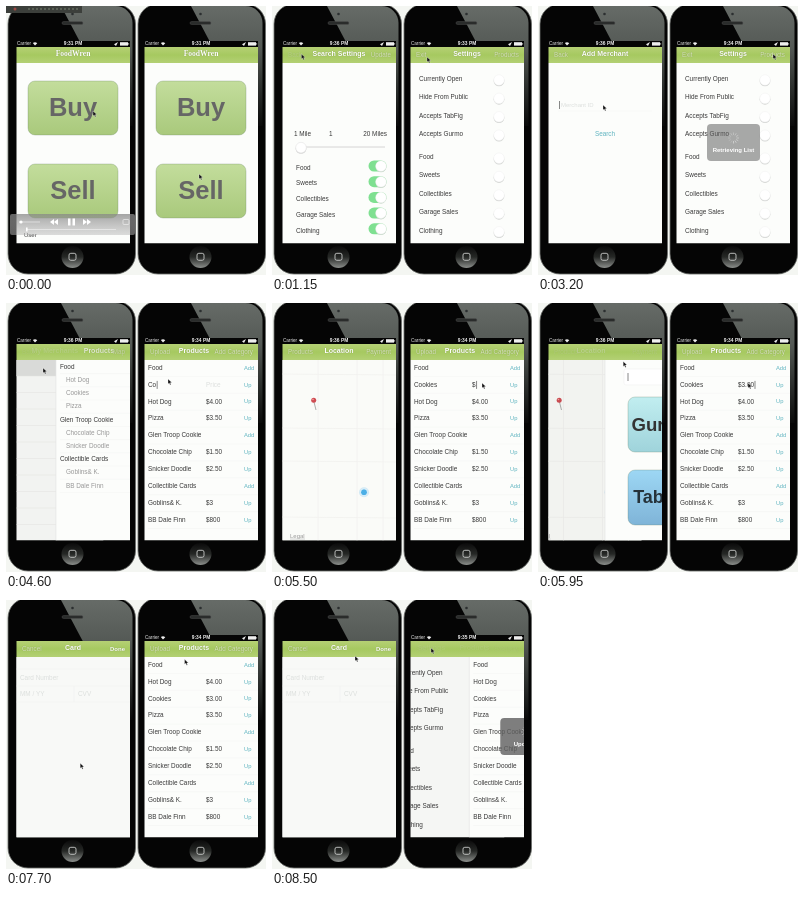
An HTML page with a canvas that plays this animation: 260x269 px, repeating every 8.55 s.

```html
<!DOCTYPE html>
<html lang="en">
<head>
<meta charset="utf-8">
<title>Two phones</title>
<style>
html, body { margin: 0; width: 100%; height: 100%; overflow: hidden; background: #fff; }
canvas { display: block; width: 260px; height: 269px; }
</style>
</head>
<body>
<canvas id="stage"></canvas>
<script>
const LOOP = 8550, STEP = 50, SLIDE = 100;
const W = 114, TOP = 41, BAR = 57, BOTTOM = 237.5;
const INK = '#3a3a3a', TEAL = '#5fb4c0', FAINT = '#dcdfdd', PAPER = '#fcfdfb';
const canvas = document.getElementById('stage');
const c = canvas.getContext('2d');
const scale = Math.max(1, window.devicePixelRatio || 1);
canvas.width = 260 * scale;
canvas.height = 269 * scale;

const clamp = v => Math.max(0, Math.min(1, v));
const lastAt = (steps, t) => steps.filter(s => s[0] <= t).pop();

function text(str, x, y, { size = 6.4, color = INK, align = 'left', bold = false } = {}) {
  c.font = `${bold ? 'bold ' : ''}${size}px "Liberation Sans", Arial, sans-serif`;
  c.textAlign = align;
  c.textBaseline = 'middle';
  c.fillStyle = color;
  c.fillText(str, x, y);
}

function rect(x, y, w, h, fill) {
  c.fillStyle = fill;
  c.fillRect(x, y, w, h);
}

function round(x, y, w, h, r, fill, stroke, width = 0.6) {
  c.beginPath();
  c.roundRect(x, y, w, h, r);
  if (fill) { c.fillStyle = fill; c.fill(); }
  if (stroke) { c.strokeStyle = stroke; c.lineWidth = width; c.stroke(); }
}

function disc(x, y, r, fill, stroke, width = 0.6) {
  round(x - r, y - r, 2 * r, 2 * r, r, fill, stroke, width);
}

function poly(points, fill) {
  c.beginPath();
  points.forEach(p => c.lineTo(...p));
  c.closePath();
  c.fillStyle = fill;
  c.fill();
}

function line(x1, y1, x2, y2, color = '#f1f2f0', width = 0.5) {
  c.strokeStyle = color;
  c.lineWidth = width;
  c.beginPath();
  c.moveTo(x1, y1);
  c.lineTo(x2, y2);
  c.stroke();
}

function shade(y, h, ...colors) {
  const g = c.createLinearGradient(0, y, 0, y + h);
  colors.forEach((color, i) => g.addColorStop(i / (colors.length - 1), color));
  return g;
}

function button(label, x, y, w, h, size, from, to, ink) {
  round(x, y, w, h, 7, shade(y, h, from, to), 'rgba(90,120,90,.45)');
  text(label, x + w / 2, y + h / 2 + 1, { size, color: ink, align: 'center', bold: true });
}

function toggle(x, y, on) {
  if (on) round(x - 8.5, y - 5.5, 18, 11, 5.5, '#7fe091');
  const k = on ? x + 4 : x;
  disc(k, y + 0.9, 5.4, on ? '#c9d9cb' : '#d3d5d3');
  disc(k, y, 5.3, '#fff', '#eceeec', 0.4);
}

function caret(x, y) { line(x, y - 4, x, y + 4, '#555', 0.7); }

function typed(str, x, y, active) {
  text(str, x, y);
  if (active) caret(x + c.measureText(str).width + 1, y);
}

const GOODS = [
  ['Food'], ['Hot Dog', '$4.00'], ['Cookies', '$3.00'], ['Pizza', '$3.50'],
  ['Glen Troop Cookie'], ['Chocolate Chip', '$1.50'], ['Snicker Doodle', '$2.50'],
  ['Collectible Cards'], ['Goblins& K.', '$3'], ['BB Dale Finn', '$800']
];
const NAME_KEYS = [[0, ''], [4550, 'C'], [4600, 'Co'], [4650, 'Cook'], [4700, 'Cookies']];
const PRICE_KEYS = [[0, ''], [5450, '$'], [5550, '$3'], [5600, '$3.'], [5650, '$3.00']];
const CASH_KEYS = [[0, ''], [6150, '1'], [6200, '12'], [6300, '12.'], [6400, '12.00']];

function home() {
  for (const [label, y] of [['Buy', 75], ['Sell', 158]])
    button(label, 12, y, 90, 54, 25.5, '#c3dd9c', '#a9c97c', '#666');
}

function editor(t) {
  let rows = GOODS.slice();
  if (t < 4400) rows.splice(2, 1);
  else if (t < 6900) [rows[1], rows[2]] = [rows[2], rows[1]];
  rows.forEach(([name, price], i) => {
    const y = 65 + i * 16.9;
    line(4, y + 8.4, W, y + 8.4);
    text(price ? 'Up' : 'Add', 100, y, { size: 5.8, color: TEAL });
    if (name === 'Cookies' && t < 6900) {
      const n = lastAt(NAME_KEYS, t)[1], p = lastAt(PRICE_KEYS, t)[1];
      typed(n, 4, y, t < 5000);
      if (p || t >= 5000) typed(p, 62, y, true);
      else text('Price', 62, y, { color: FAINT });
    } else {
      text(name, 4, y);
      if (price) text(price, 62, y);
    }
  });
  hud('Updating', t, 8200);
}

function hud(label, t, from) {
  const alpha = clamp((t - from) / 150);
  if (!alpha) return;
  c.save();
  c.globalAlpha = alpha;
  round(31, 118, 53, 37, 4, 'rgba(95,95,95,.8)');
  for (let i = 0; i < 12; i++) {
    const a = i * Math.PI / 6, x = Math.cos(a), y = Math.sin(a);
    const glow = 0.25 + 0.6 * ((i - t / STEP + 1200) % 12) / 12;
    line(57.5 + 3 * x, 132 + 3 * y, 57.5 + 5.5 * x, 132 + 5.5 * y, `rgba(255,255,255,${glow})`, 0.8);
  }
  c.globalAlpha = 1;
  text(label, 57.5, 144.5, { size: 6, color: '#fff', align: 'center', bold: true });
  c.restore();
}

const PAGES = {
  buyHome: {
    title: 'FoodWren', brand: true,
    draw() { home(); text('User', 8, 229, { size: 6 }); }
  },
  sellHome: { title: 'FoodWren', brand: true, draw: home },
  search: {
    title: 'Search Settings', left: 'Back', right: 'Update', dimLeft: true,
    draw() {
      text('1 Mile', 12, 128);
      text('1', 47, 128);
      text('20 Miles', 105, 128, { align: 'right' });
      line(14, 141, 103, 141, '#c9c9c9', 0.8);
      disc(19, 142.4, 5.4, '#d2d2d2');
      disc(19, 141.6, 5.3, '#fff', '#e4e4e4');
      ['Food', 'Sweets', 'Collectibles', 'Garage Sales', 'Clothing'].forEach((s, i) => {
        const y = 162 + i * 15.7;
        text(s, 14, y);
        toggle(95, y - 2, true);
      });
    }
  },
  merchants: {
    title: 'My Merchants', left: 'Back', right: 'Add',
    draw(t) {
      if (t >= 4450) rect(0, BAR, W, 16, '#e2e3e1');
      for (let y = 73; y < BOTTOM; y += 16.5) line(0, y, W, y, '#e8e9e7');
    }
  },
  add: {
    title: 'Add Merchant', left: 'Back',
    draw() {
      text('Merchant ID', 13, 99, { size: 6, color: FAINT });
      line(10, 105, 104, 105);
      caret(11.5, 99);
      text('Search', 57, 128, { color: TEAL, align: 'center' });
    }
  },
  shop: {
    title: 'Products', right: 'Map',
    draw() {
      GOODS.forEach(([name, price], i) => {
        const y = 64 + i * 13.2;
        text(name, price ? 10 : 4, y, { color: price ? '#999' : INK });
        line(4, y + 6.6, W, y + 6.6);
      });
    }
  },
  map: {
    title: 'Location', left: 'Products', right: 'Payment',
    draw() {
      rect(0, BAR, W, BOTTOM - BAR, '#fafbf8');
      for (const x of [36, 75, 101]) line(x, BAR, x, BOTTOM, '#f1f2ef', 0.8);
      for (const y of [71, 125, 158, 214]) line(0, y, W, y + 1, '#f1f2ef', 0.8);
      line(32, 99, 34, 107, '#999', 0.8);
      disc(31.7, 97.3, 2.5, '#cf4c52');
      disc(31, 96.5, 0.8, '#f4a0a0');
      disc(82, 189.3, 5, 'rgba(90,180,235,.25)');
      disc(82, 189.3, 3.5, '#4cafe6', '#fff', 0.8);
      text('Legal', 8, 233, { size: 6, color: '#999' });
      line(8, 236, 23, 236, '#aaa');
    }
  },
  pay: {
    title: 'Payment', left: 'Location',
    draw(t) {
      const down = t >= 6750 && t < 6900;
      round(19, 66, 76, 16, 2, '#fff', '#f0f0f0');
      typed(lastAt(CASH_KEYS, t)[1], 22, 74, true);
      button('Gurmo', 23, 94, 68, 55, 18.6, '#c1eef0', '#9fd3db', down ? '#98bec3' : '#333');
      button('TabFig', 23, 167, 68, 55, 18, '#9dd7f4', '#7fb4d8', '#26323a');
    }
  },
  card: {
    title: 'Card', left: 'Cancel', right: 'Done', boldRight: true,
    draw() {
      rect(0, BAR, W, BOTTOM - BAR, '#f8f9f7');
      for (const y of [69, 86, 102]) line(0, y, W, y, '#eeefed');
      line(58, 86, 58, 102, '#eeefed');
      text('Card Number', 4, 78, { color: FAINT });
      text('MM / YY', 4, 94, { color: FAINT });
      text('CVV', 62, 94, { color: FAINT });
    }
  },
  settings: {
    title: 'Settings', left: 'Exit', right: 'Products',
    draw(t) {
      const rows = ['Currently Open', 'Hide From Public', 'Accepts TabFig', 'Accepts Gurmo',
        'Food', 'Sweets', 'Collectibles', 'Garage Sales', 'Clothing'];
      rows.forEach((s, i) => {
        const y = 73 + i * 18.4 + (i > 3 ? 4.6 : 0);
        text(s, 9, y);
        toggle(89, y + 1, false);
      });
      if (t < 3500) hud('Retrieving List', t, 3100);
    }
  },
  editor: { title: 'Products', left: 'Upload', right: 'Add Category', mid: 50, draw: editor }
};

// Each scene: start, page, how it arrives. Each pointer entry: time, x, y.
const PHONES = [
  {
    x: 10, body: 2, clock: [[0, '9:31 PM'], [600, '9:36 PM'], [7500, '']],
    scenes: [[0, 'buyHome'], [500, 'search', 'push'], [1200, 'merchants', 'pop'],
      [2400, 'add', 'push'], [3900, 'merchants', 'pop'], [4535, 'shop', 'push'],
      [5000, 'map', 'push'], [5900, 'pay', 'push'], [7500, 'card', 'modal']],
    pointer: [[0, 87, 105], [400, 87, 105], [600, 103, 160], [1000, 30, 48], [1250, 29, 48],
      [2300, 110, 48], [2700, 65, 99], [3600, 65, 99], [3850, 24, 48], [4300, 37, 65],
      [4850, 37, 65], [4950, 112, 48], [5100, -9, 48], [5800, -9, 48], [5850, 102, 48],
      [6100, 60, 74], [6500, 60, 74], [6700, 75, 123], [6950, 75, 123], [7300, 72, 190],
      [7600, 72, 190], [8100, 83, 56], [8550, 83, 56]]
  },
  {
    x: 138, body: 132, clock: [[0, '9:31 PM'], [600, '9:33 PM'], [2000, '9:34 PM'], [7800, '9:35 PM']],
    scenes: [[0, 'sellHome'], [600, 'settings', 'push'], [3500, 'editor', 'push'],
      [8448, 'settings', 'pop']],
    pointer: [[0, 193, 168], [600, 193, 180], [1000, 155, 51], [1500, 155, 51], [2900, 235, 48],
      [3600, 235, 48], [4300, 242, 64], [4500, 162, 76], [4900, 162, 76], [5200, 210, 80],
      [6200, 210, 80], [6600, 247, 99], [7000, 247, 99], [7900, 159, 48], [8550, 159, 48]]
  }
];

function headerText(page, alpha, shift) {
  c.save();
  c.globalAlpha = alpha;
  c.shadowColor = 'rgba(80,105,35,.6)';
  c.shadowBlur = scale;
  c.shadowOffsetY = 0.4 * scale;
  if (page.brand) {
    c.font = 'bold 7.6px "Liberation Serif", "Times New Roman", serif';
    c.textAlign = 'center';
    c.textBaseline = 'middle';
    c.fillStyle = '#fff';
    c.fillText(page.title, 57 + shift, 48);
  } else {
    text(page.title, (page.mid || 57) + shift, 48, { size: 7, color: '#fff', align: 'center', bold: true });
  }
  const side = { size: 6.3, color: '#dde8c2' };
  const done = page.boldRight && { bold: true, color: '#fff', size: 6 };
  if (page.right) text(page.right, 109, 49, { ...side, ...done, align: 'right' });
  if (page.dimLeft) c.globalAlpha *= 0.4;
  if (page.left) text(page.left, 6, 49, side);
  c.restore();
}

function headerBar() {
  rect(0, TOP, W, BAR - TOP, shade(TOP, BAR - TOP, '#b5d074', '#a6c960', '#b3d074'));
}

function body(page, x, t) {
  c.save();
  c.translate(x, 0);
  rect(0, BAR, W, BOTTOM - BAR, PAPER);
  page.draw(t);
  c.restore();
}

function screen(phone, t) {
  const scene = lastAt(phone.scenes, t);
  const before = phone.scenes[phone.scenes.indexOf(scene) - 1];
  const now = PAGES[scene[1]];
  const p = before ? clamp((t - scene[0]) / SLIDE) : 1;
  c.save();
  c.translate(phone.x, 0);
  c.beginPath();
  c.rect(0.5, TOP, W - 0.5, BOTTOM - TOP);
  c.clip();
  if (p === 1) {
    body(now, 0, t);
    headerBar();
    headerText(now, 1, 0);
  } else if (scene[2] === 'modal') {
    const old = PAGES[before[1]];
    body(old, 0, t);
    headerBar();
    headerText(old, 1, 0);
    c.translate(0, (1 - p) * (BOTTOM - TOP));
    body(now, 0, t);
    headerBar();
    headerText(now, 1, 0);
  } else {
    const old = PAGES[before[1]], push = scene[2] === 'push';
    const over = push ? 1 - p : p;
    body(push ? old : now, -0.36 * W * (1 - over), t);
    rect(0, BAR, W, BOTTOM - BAR, `rgba(0,0,0,${0.06 * (1 - over)})`);
    body(push ? now : old, over * W, t);
    line(over * W, BAR, over * W, BOTTOM, '#dcdcdc');
    headerBar();
    const dir = push ? 1 : -1;
    headerText(old, 0.6 * (1 - p) * (push ? 1 : 0.4), -dir * p * 28);
    headerText(now, clamp((p - 0.5) * 5), dir * (1 - p) * 74);
  }
  c.restore();
}

// Diagonal reflection across the upper right of the glass.
function gloss(x) {
  c.save();
  c.beginPath();
  c.roundRect(x + 2.5, 0, 122, 266, 17);
  c.clip();
  poly([[x + 53, 0], [x + 127, 0], [x + 127, 120], [x + 118, 120], [x + 72, 36]],
    shade(0, 120, '#666b67', '#555a56', '#2e312f', '#0a0a0a'));
  c.restore();
}

function shell(phone, t) {
  const mid = phone.x + 57;
  round(phone.body, -2, 127.5, 270, 20, '#050505', '#6c6f6c', 0.8);
  gloss(phone.body);
  disc(mid - 0.5, 8, 1.3, '#2b2f30');
  round(mid - 11, 15.5, 21, 3, 1.5, '#2a2c2b', '#555', 0.4);
  disc(mid - 0.5, 251, 11, shade(240, 22, '#0a0a0a', '#262826', '#8b8e8b'));
  round(mid - 4, 247.3, 7, 7, 1.8, null, '#c9cbc9', 0.9);
  const clock = lastAt(phone.clock, t)[1];
  if (!clock) return;
  const white = '#eee';
  rect(phone.x, 35, W, TOP - 35, '#050505');
  text('Carrier', phone.x + 1, 37.8, { size: 4.6, color: white });
  c.fillStyle = white;
  c.beginPath();
  c.moveTo(phone.x + 19, 39.5);
  c.arc(phone.x + 19, 39.5, 3.2, -2.3, -0.8);
  c.fill();
  text(clock, mid, 37.8, { size: 4.9, color: white, align: 'center', bold: true });
  poly([[phone.x + 98, 38.2], [phone.x + 102, 36], [phone.x + 100, 40]], white);
  rect(phone.x + 104, 36.2, 8, 3.4, white);
  rect(phone.x + 112.3, 37.2, 0.8, 1.4, white);
}

function pointer(keys, t) {
  const i = keys.findIndex(k => k[0] > t);
  const a = keys[i - 1], b = keys[i];
  const u = (t - a[0]) / (b[0] - a[0]);
  c.save();
  c.translate(a[1] + (b[1] - a[1]) * u, a[2] + (b[2] - a[2]) * u);
  poly([[0, 0], [0, 5], [1.2, 4], [2.1, 6], [3, 5.6], [2.2, 3.7], [3.8, 3.6]], '#111');
  c.strokeStyle = 'rgba(255,255,255,.8)';
  c.lineWidth = 0.4;
  c.stroke();
  c.restore();
}

function player(t) {
  const alpha = 1 - clamp((t - 100) / 200);
  if (!alpha) return;
  c.save();
  c.globalAlpha = alpha;
  rect(0, 0, 76, 7, '#3c3f3b');
  for (let x = 22; x < 74; x += 4) rect(x, 2, 2, 2, '#596055');
  disc(9, 3, 1.5, '#9b4a45');
  round(4, 208, 125, 21, 2, shade(208, 21, 'rgba(135,135,135,.75)', 'rgba(185,185,185,.5)'));
  line(13, 216, 34, 216, '#ddd', 1);
  disc(15, 216, 1.6, '#fff');
  for (const [x, d] of [[46, -1], [50, -1], [79, 1], [83, 1]])
    poly([[x - 2 * d, 213], [x + 2 * d, 216], [x - 2 * d, 219]], '#fff');
  rect(62, 212.5, 2.5, 7, '#fff');
  rect(66.5, 212.5, 2.5, 7, '#fff');
  round(117, 213.5, 6, 5, 1, null, '#eee', 0.7);
  line(21, 223.5, 110, 223.5, '#e5e5e5', 1.2);
  rect(20, 221.5, 1.6, 4, '#fff');
  c.restore();
}

function draw(t) {
  c.setTransform(scale, 0, 0, scale, 0, 0);
  rect(0, 0, 260, 269, '#f4f6f2');
  for (const phone of PHONES) {
    shell(phone, t);
    screen(phone, t);
  }
  player(t);
  for (const phone of PHONES) pointer(phone.pointer, t);
}

const start = performance.now();
function tick() {
  const t = (performance.now() - start) % LOOP;
  draw(Math.floor(t / STEP) * STEP);
  requestAnimationFrame(tick);
}
tick();
</script>
</body>
</html>
```
